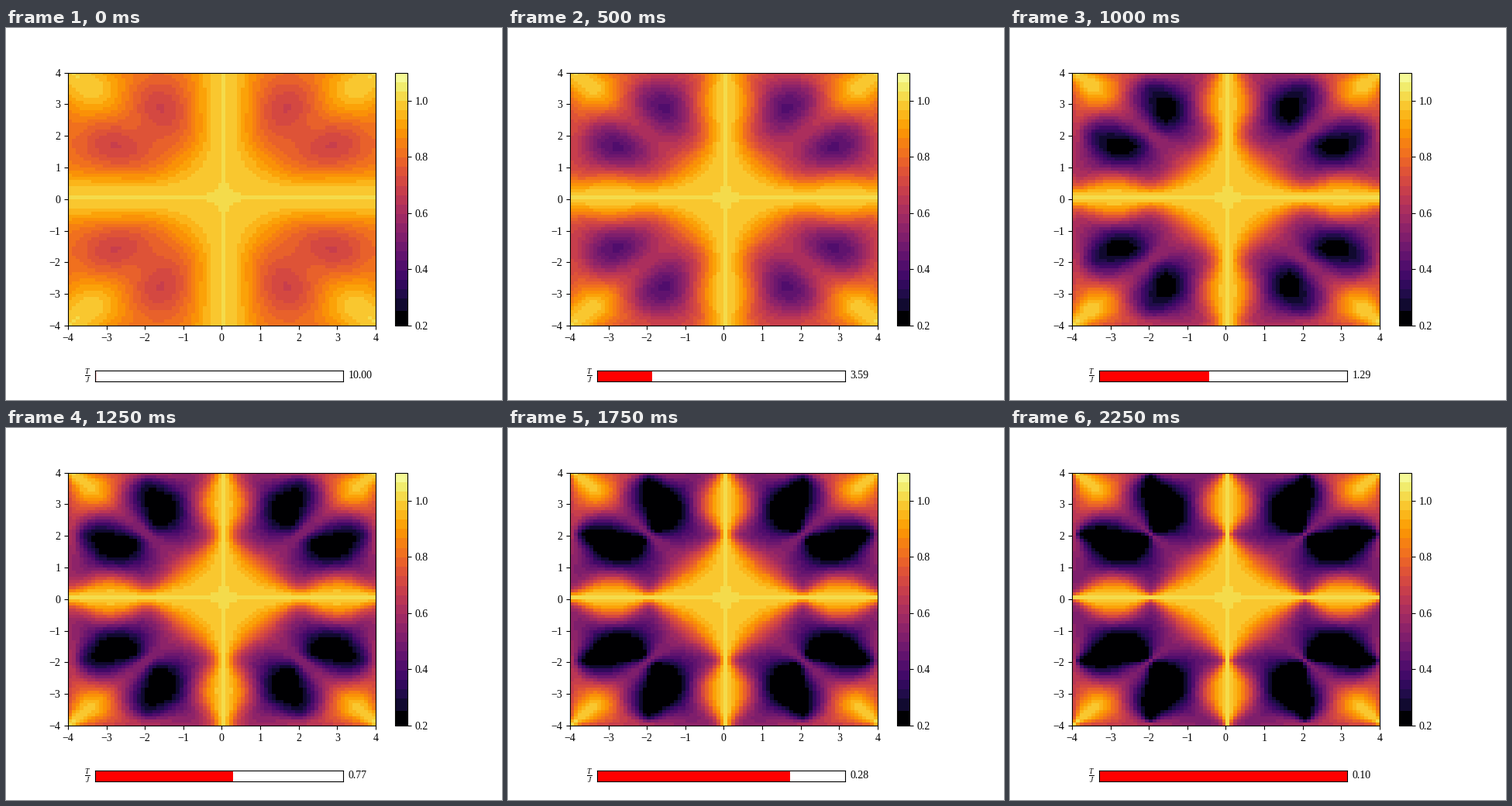
Write a matplotlib script that moves like this. It is 640 px wide and 480 px high and loops after 2.5 s.

```python
import numpy as np
import matplotlib.pyplot as plt
from matplotlib.animation import FuncAnimation
from matplotlib.colors import ListedColormap
from matplotlib.patches import Rectangle

plt.rcParams.update({
    "font.family": "Liberation Serif",
    "font.size": 10,
    "mathtext.fontset": "custom",
    "mathtext.rm": "Liberation Serif",
    "mathtext.it": "Liberation Serif:italic",
})

STEPS = 10
VMIN, VMAX = 0.2, 1.1
temperatures = np.logspace(1, -1, STEPS)

# Scattering plane (h, k, 0) of the pyrochlore lattice
axis = np.arange(80) * 0.1 - 4
h, k = np.meshgrid(axis, axis)
q2 = np.maximum(h**2 + k**2, 1e-12)
a, b = np.pi * (h + k) / 4, np.pi * (h - k) / 4
band = 4 * np.cos(np.pi * h / 2) * np.cos(np.pi * k / 2)
out_of_plane = 2 * (np.cos(a) - np.cos(b))**2
in_plane = 2 * ((h - k) * np.sin(a) - (h + k) * np.sin(b))**2 / q2

# Dispersive bands over the whole zone, for the spin length constraint
x, y, z = np.meshgrid(*[np.cos(np.pi * np.arange(24) / 12)] * 3)
split = 2 * np.sqrt(np.maximum(1 + x * y + y * z + z * x, 0))


def multiplier(beta):
    """Lagrange multiplier that keeps the mean squared spin at one."""
    low, high = 0.4, 1.0
    for _ in range(30):
        lam = (low + high) / 2
        upper = 1 / (lam + beta * (4 + split))
        lower = 1 / (lam + beta * (4 - split))
        length = 0.5 / lam + 0.25 * (upper + lower).mean()
        low, high = (lam, high) if length > 1 else (low, lam)
    return lam


def structure_factor(temperature):
    beta = 1 / temperature
    lam = multiplier(beta)
    flat = 1 - beta * out_of_plane / (lam + beta * (4 + band))
    flip = 1 - beta * in_plane / (lam + beta * (4 - band))
    return (flat + flip) / 2


def banded_inferno():
    edges = np.concatenate([[0, 0.058], np.linspace(0.107, 1, 25)])
    colors = plt.get_cmap("inferno")((edges[:-1] + edges[1:]) / 2)
    colors[0] = (0, 0, 0.01, 1)
    levels = (np.arange(512) + 0.5) / 512
    return ListedColormap(colors[np.digitize(levels, edges) - 1])


maps = [structure_factor(t) for t in temperatures]

fig, ax = plt.subplots(figsize=(6.4, 4.8), dpi=100)
fig.subplots_adjust(left=0.125, right=0.9, bottom=0.2, top=0.88)
image = ax.imshow(maps[0], origin="lower", extent=(-4, 4, -4, 4),
                  aspect="auto", interpolation="nearest",
                  cmap=banded_inferno(), vmin=VMIN, vmax=VMAX)
ax.set_xticks(range(-4, 5))
ax.set_yticks(range(-4, 5))
fig.colorbar(image, ax=ax, ticks=[0.2, 0.4, 0.6, 0.8, 1.0])

# Temperature bar
bar_ax = fig.add_axes([0.18, 0.05, 0.5, 0.03])
bar_ax.set(xlim=(0, STEPS - 1), ylim=(0, 1), xticks=[], yticks=[])
fill = bar_ax.add_patch(Rectangle((0, 0), 0, 1, color="red", lw=0))
bar_ax.axvline(0, color="red", lw=1)
bar_ax.text(-0.02, 0.5, r"$\frac{T}{J}$", transform=bar_ax.transAxes,
            ha="right", va="center")
value = bar_ax.text(1.02, 0.5, "", transform=bar_ax.transAxes,
                    ha="left", va="center")


def update(step):
    image.set_data(maps[step])
    fill.set_width(step)
    value.set_text(f"{temperatures[step]:.2f}")
    return image, fill, value


anim = FuncAnimation(fig, update, frames=STEPS, interval=250,
                     repeat=True, repeat_delay=0)
plt.show()
```
